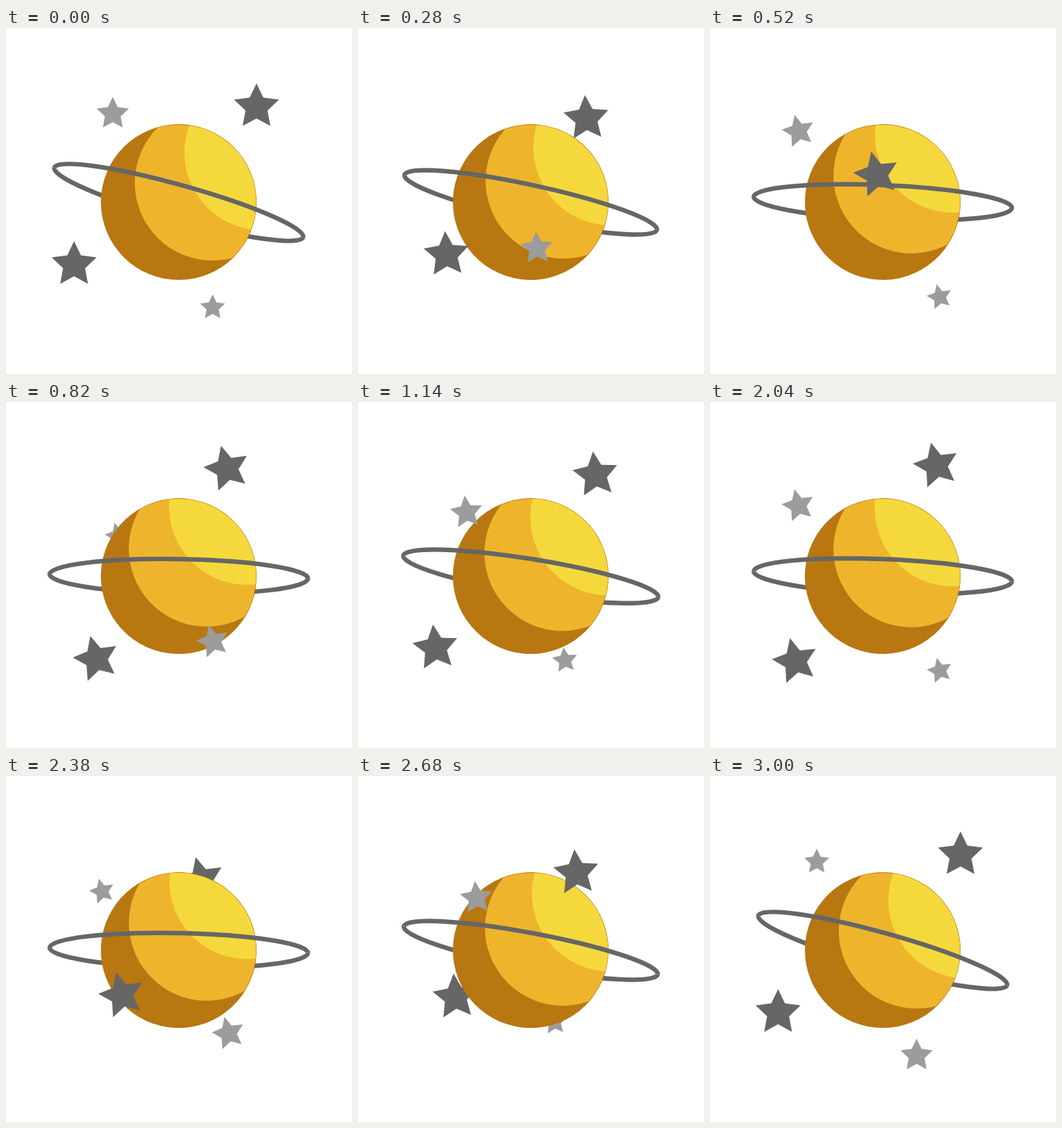
An HTML page with a canvas for the animation above (3020 ms loop, 500 px wide and 500 px high).

```html
<!DOCTYPE html>
<html lang="en">
<head>
<meta charset="utf-8">
<title>Planet</title>
<style>
  html, body { margin: 0; width: 100%; height: 100%; overflow: hidden; background: #fff; }
  canvas { display: block; width: 500px; height: 500px; }
</style>
</head>
<body>
<canvas id="stage" width="500" height="500"></canvas>
<script>
const ctx = document.getElementById('stage').getContext('2d');
const LOOP = 3020, STEP = 20, CYCLE = 3000;
const DARK = '#666666', LIGHT = '#9c9c9c';
const RADIUS = 112.5;
const TILT = 15.6, SWING = 14.7;
const rad = deg => deg * Math.PI / 180;

// Star positions relative to the planet's centre, at rest
const UPPER = [112.4, -137.6], LOWER = [-151.2, 90.5];
const TOP = [-95.3, -127.6], BOTTOM = [49, 152.4];

const ease = u => u < 0.5 ? 4 * u ** 3 : 1 - 4 * (1 - u) ** 3;
const progress = (t, span) => ease(t % span / span);

function swing(t) {
  const phase = t % 1500 / 750;
  return ease(phase < 1 ? phase : 2 - phase);
}

function disc(x, y, color) {
  ctx.fillStyle = color;
  ctx.beginPath();
  ctx.arc(x, y, RADIUS, 0, Math.PI * 2);
  ctx.fill();
}

function star(from, to, p, r, color) {
  const x = from[0] + (to[0] - from[0]) * p;
  const y = from[1] + (to[1] - from[1]) * p;
  ctx.fillStyle = color;
  ctx.beginPath();
  for (let i = 0; i < 10; i++) {
    const d = i % 2 ? r * 0.49 : r;
    const a = rad(i * 36 - 90);
    ctx.lineTo(x + d * Math.cos(a), y + d * Math.sin(a));
  }
  ctx.fill();
}

function ring(start, end) {
  ctx.strokeStyle = DARK;
  ctx.lineWidth = 6.5;
  ctx.beginPath();
  ctx.ellipse(0, 0.4, 186.7, 25, rad(TILT), start, end);
  ctx.stroke();
}

function planet() {
  disc(0, 0, '#b87710');
  ctx.save();
  ctx.beginPath();
  ctx.arc(0, 0, RADIUS - 0.8, 0, Math.PI * 2);
  ctx.clip();
  disc(49, -28, '#eeb52c');
  disc(120.7, -71.8, '#f5d93c');
  ctx.restore();
}

function draw(t) {
  const slow = progress(t, 1000);
  const quick = progress(t, 500);
  ctx.clearRect(0, 0, 500, 500);
  ctx.save();
  ctx.translate(249.6, 251.6);
  ctx.rotate(-rad(SWING * swing(t)));

  star(UPPER, LOWER, slow, 34.1, DARK);
  star(BOTTOM, TOP, quick, 18.9, LIGHT);
  ring(0, Math.PI);
  planet();
  ring(Math.PI, Math.PI * 2);
  star(TOP, BOTTOM, quick, 24.4, LIGHT);
  star(LOWER, UPPER, slow, 34.1, DARK);

  ctx.restore();
}

// Each step shows the middle of its share of the cycle
const began = performance.now();
function frame() {
  const step = Math.floor((performance.now() - began) % LOOP / STEP);
  draw((step + 0.5) * STEP * CYCLE / LOOP);
  requestAnimationFrame(frame);
}
frame();
</script>
</body>
</html>
```
